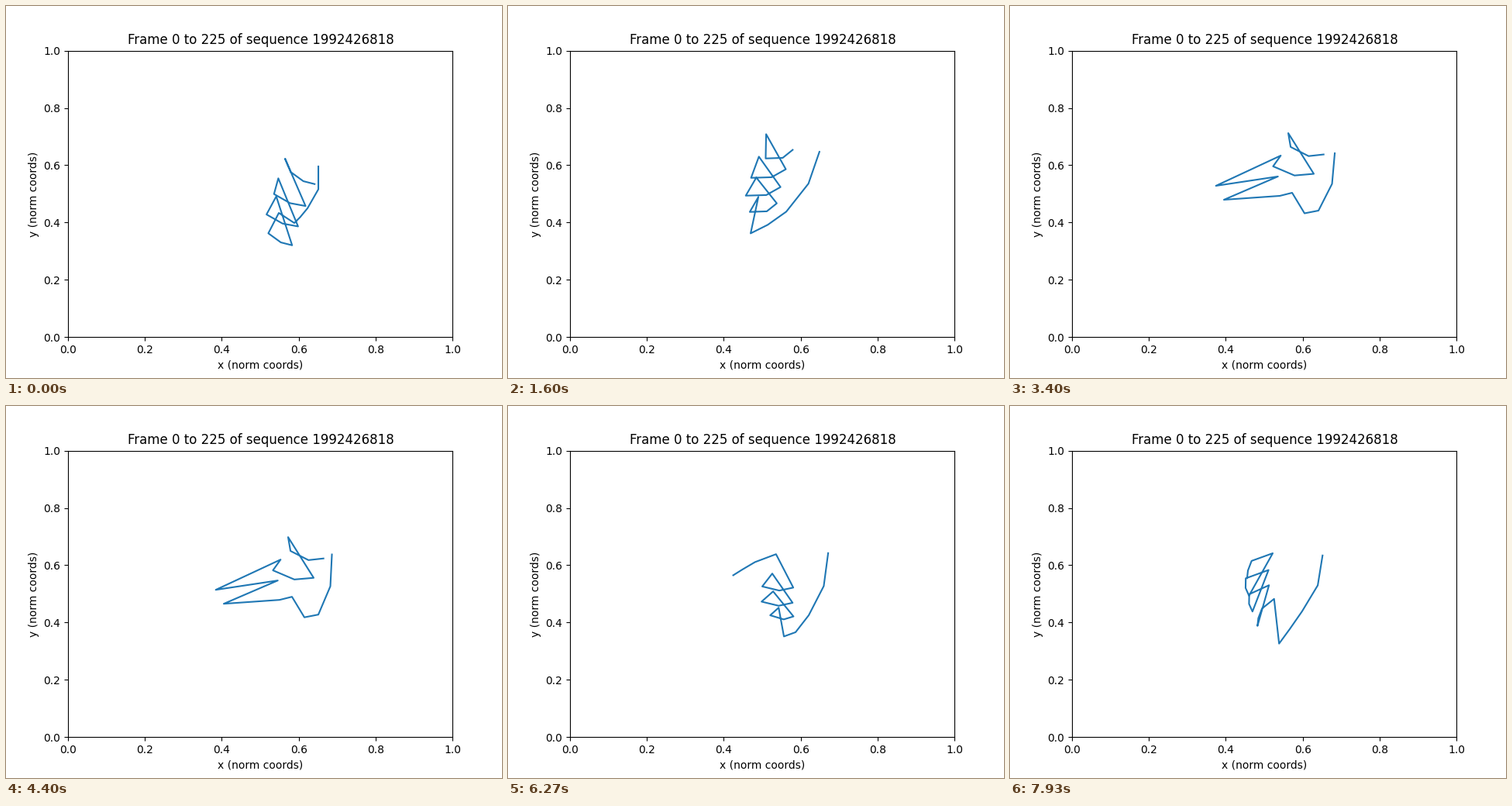
These frames come from a looping animation (640 by 480 pixels, 8 s). A matplotlib script:

```python
import numpy as np
import matplotlib.pyplot as plt
from matplotlib.animation import FuncAnimation

FRAMES = 120
LOOP_MS = 8000

# Stage points are complex numbers x + y*1j in pixels, y pointing down.
ROW_BOW = -6 + 2j                      # inner knuckles sit off the straight row
ARCH = np.array([-6, -1.5, 4])         # inner fingers bulge and hook back
STRAIGHT = np.array([0.43, 0.75, 1])   # joints along a stretched finger


def curled(angle, bend, first, second):
    """Three bones, each turned further than the one before."""
    turns = np.radians([angle, angle - bend, angle - 1.35 * bend])
    return np.cumsum([first, second, 0.75 * second] * np.exp(1j * turns))


def hand(wrist, thumb, tip, row, curl, drift, bend=2, reach={}):
    """Wrist, thumb and four fingers from index to pinky as one path.

    row: first and last knuckle; curl: shape shared by the bent fingers;
    drift: its change per finger; reach: stretched fingers, as tip vectors.
    """
    path = [wrist, (wrist + thumb) / 2 + 7 + 2.5j, thumb,
            (thumb + tip) / 2 - 1 + bend * 1j, tip]
    shape = curled(*curl)
    for k in range(4):
        inner = k in (1, 2)
        knuckle = row[0] + (row[1] - row[0]) * k / 3 + inner * ROW_BOW
        if k in reach:
            joints = reach[k] * STRAIGHT
        else:
            joints = shape + drift * (k - 1.5) + inner * ARCH
        path += [knuckle, *(knuckle + joints)]
    return np.array(path)


loose_fist = hand(403 + 207j, 389 + 261j, 372 + 280j,
                  row=(352 + 267j, 360 + 197j),
                  curl=(98, 62, 22, 20), drift=7 - 3j)
tight_fist = hand(405 + 191j, 368 + 262j, 334 + 234j, bend=6,
                  row=(330 + 247j, 338 + 173j),
                  curl=(111, 90, 33, 22.5), drift=3.5 + 1j)
thumb_out = hand(403 + 188j, 363 + 265j, 317 + 293j, bend=3,
                 row=(327 + 246j, 337 + 165j),
                 curl=(103, 105, 26, 22), drift=3.5 + 4j)
two_out = hand(419 + 190j, 398 + 264j, 364 + 241j, bend=15,
               row=(348 + 245j, 359 + 164j),
               curl=(122, 95, 14, 26), drift=7 + 4j,
               reach={0: -72 + 5j, 1: -80 + 12j})
pinky_out = hand(413 + 189j, 387 + 269j, 353 + 290j, bend=10,
                 row=(348 + 261j, 343 + 189j),
                 curl=(102, 97, 16.5, 22.5), drift=3 + 4j,
                 reach={3: -62 + 23j})
hooked = hand(409 + 191j, 378 + 267j, 354 + 320j, bend=1,
              row=(340 + 250j, 343 + 193j),
              curl=(159, 62, 28, 19), drift=-2 + 1j)
hooked_tight = hand(403 + 193j, 377 + 265j, 347 + 306j,
                    row=(341 + 249j, 339 + 190j),
                    curl=(152, 40, 24, 13), drift=-4 - 1j)

# Offsets move the fingers fully and the wrist only a little.
sway = np.ones(21)
sway[:2] = 0.3, 0.6

# Time step, pose, offset.
keys = [
    (0, loose_fist, 0),
    (4, loose_fist, 12 + 27j),
    (10, tight_fist, -8 + 5j),
    (13, tight_fist, 0),
    (19, thumb_out, -20 + 10j),
    (26, thumb_out, -2j),
    (35, thumb_out, 0),
    (40, thumb_out, 0),
    (47, two_out, -3 + 1j),
    (51, two_out, 0),
    (58, two_out, 4 + 10j),
    (67, two_out, 5 + 5j),
    (74, pinky_out, -4 - 4j),
    (81, pinky_out, 0),
    (92, pinky_out, 3 + 2j),
    (99, hooked, 2 - 1j),
    (105, hooked, 0),
    (112, hooked, -4 - 3j),
    (119, hooked_tight, 0),
]
times = [key[0] for key in keys]


def pose_at(frame):
    i = min(np.searchsorted(times, frame, side="right"), len(keys) - 1)
    (t0, a, da), (t1, b, db) = keys[i - 1], keys[i]
    u = (frame - t0) / (t1 - t0)
    u = u * u * (3 - 2 * u)
    return (1 - u) * (a + sway * da) + u * (b + sway * db)


fig, ax = plt.subplots(figsize=(6.4, 4.8), dpi=100)
fig.subplots_adjust(right=0.9001)
ax.set(xlim=(0, 1), ylim=(0, 1),
       xlabel="x (norm coords)", ylabel="y (norm coords)")
ax.set_title("Frame 0 to 225 of sequence 1992426818", x=0.5014)
line, = ax.plot([], [], color="C0", lw=1.5)


def update(frame):
    pts = pose_at(frame)
    line.set_data((pts.real - 80) / 496, (427.2 - pts.imag) / 369.6)
    return line,


anim = FuncAnimation(fig, update, frames=FRAMES, interval=LOOP_MS / FRAMES,
                     repeat=True, repeat_delay=0)
plt.show()
```
